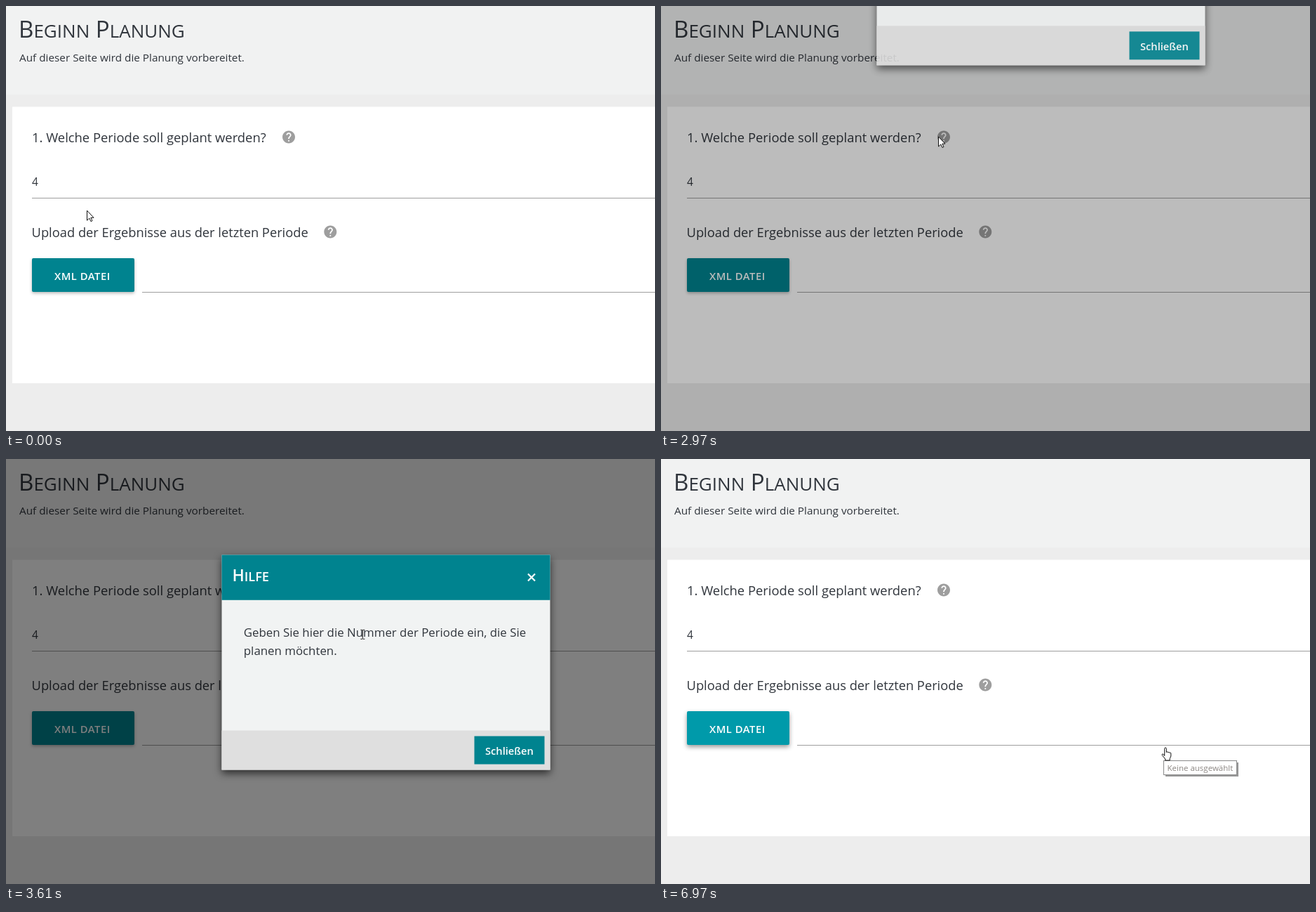
Write an HTML page that moves like this. It is 925x605 px and loops after 7050 ms.

```html
<!DOCTYPE html>
<html lang="de">
<head>
<meta charset="utf-8">
<title>Beginn Planung</title>
<style>
  html, body { margin: 0; width: 100%; height: 100%; overflow: hidden; background: #ededed; }
  svg { display: block; width: 100%; height: 100%; font-family: "Open Sans", "Noto Sans", sans-serif; fill: #30353c; }
  .title { font-size: 33px; }
  .title tspan { font-size: 26px; }
  .light { fill: #fff; font-weight: 600; }
  .rule { stroke: #9e9e9e; }
  #dialog > rect:first-child { filter: drop-shadow(0 5px 6px rgba(0, 0, 0, .65)); }
  .pointer { fill: #fff; stroke: #111; stroke-linejoin: round; }
</style>
</head>
<body>
<svg viewBox="0 0 925 605">
  <defs>
    <path id="help" fill="#9e9e9e" transform="scale(.9) translate(-12 -12)" d="M12 2C6.48 2 2 6.48 2 12s4.48 10 10 10 10-4.48 10-10S17.52 2 12 2zm1 17h-2v-2h2v2zm2.07-7.75l-.9.92C13.45 12.9 13 13.5 13 15h-2v-.5c0-1.1.45-2.1 1.17-2.83l1.24-1.26c.37-.36.59-.86.59-1.41 0-1.1-.9-2-2-2s-2 .9-2 2H8c0-2.21 1.79-4 4-4s4 1.79 4 4c0 .88-.36 1.68-.93 2.25z"/>
  </defs>

  <rect width="925" height="605" fill="#ededed"/>
  <rect width="925" height="126" fill="#f1f2f2"/>
  <text class="title" x="18" y="45">B<tspan>EGINN</tspan> P<tspan>LANUNG</tspan></text>
  <text x="19" y="79" font-size="15.3">Auf dieser Seite wird die Planung vorbereitet.</text>

  <rect x="9" y="143.5" width="916" height="393.5" fill="#fff"/>
  <text x="37" y="194" font-size="18.4">1. Welche Periode soll geplant werden?</text>
  <use href="#help" x="403" y="186.5"/>
  <text x="37" y="256" font-size="15.5">4</text>
  <path class="rule" d="M37 273.5H925M194 407.5H925"/>
  <text x="36.6" y="329" font-size="18.3">Upload der Ergebnisse aus der letzten Periode</text>
  <use href="#help" x="462.3" y="321.5"/>
  <rect id="upload" x="37" y="359" width="146" height="48" rx="2"/>
  <text class="light" x="69" y="389.7" font-size="14.8" letter-spacing=".5">XML DATEI</text>

  <rect id="overlay" width="925" height="605" fill="#000"/>

  <g id="dialog">
    <rect x="307.5" width="468" height="306" fill="#f1f3f3"/>
    <rect x="307.5" width="468" height="64.3" fill="#00838f"/>
    <text class="light" x="322.5" y="37.5" font-size="23">H<tspan font-size="18.2">ILFE</tspan></text>
    <path d="M744 27l10 10m0-10l-10 10" stroke="#fff" stroke-width="2.2"/>
    <text x="338.8" y="116" font-size="16.85">Geben Sie hier die Nummer der Periode ein, die Sie</text>
    <text x="338.8" y="142.5" font-size="16.85">planen möchten.</text>
    <rect x="307.5" y="250" width="468" height="56" fill="#dfdfdf"/>
    <rect x="667.5" y="258" width="100" height="40" fill="#00838f"/>
    <circle id="ripple" cx="717" cy="273" r="9" fill="#fff" opacity=".13"/>
    <text class="light" x="683" y="284.3" font-size="14.7">Schließen</text>
  </g>

  <g id="tooltip">
    <path d="M719 432h104v20H719z" fill="#777" opacity=".75"/>
    <rect x="716.5" y="429.5" width="104" height="20" fill="#fff" stroke="#8a8a8a"/>
    <text x="721.5" y="444" font-size="11.5" fill="#8b8682">Keine ausgewählt</text>
  </g>

  <g id="cursor">
    <path id="arrow" class="pointer" d="M.5.5V14.5L3.8 11.4 6 16 8 15 5.9 10.6H10Z"/>
    <path id="beam" fill="none" stroke="#222" d="M-3-6.5h2.5L0-6 .5-6.5H3M0-6V6M-3 6.5h2.5L0 6l.5.5H3"/>
    <path id="hand" class="pointer" transform="translate(-5.8 -.5)" d="M4.5 12V1.8a1.3 1.3 0 0 1 2.6 0V7a1.2 1.2 0 0 1 2.3.4 1.2 1.2 0 0 1 2.2.5 1.1 1.1 0 0 1 2 .6V12.5L12 16v2.5H5.5v-2L1 11Q.6 9.2 2.3 9.4Z"/>
  </g>
</svg>

<script>
const LOOP = 7050;
const $ = id => document.getElementById(id);
const clamp = v => Math.max(0, Math.min(1, v));
const mix = (a, b, p) => a + (b - a) * p;
const smooth = p => p * p * (3 - 2 * p);
const show = (id, opacity) => $(id).setAttribute("opacity", opacity);

// Number of steps already taken in an evenly stepped stretch of time.
const stepsTaken = (t, start, end, count) => t < start ? 0 :
  Math.min(count, Math.floor((t - start + 8) / ((end - start) / (count - 1))) + 1);

// Moves of the pointer: start, end, steps, target x and y, bend of the path.
const moves = [
  [840, 1460, 9, 264, 236.5],
  [1550, 2190, 9, 388, 188.5],
  [2280, 2350, 2, 395, 185.5],
  [3380, 4070, 10, 717, 399, 1.15],
  [4160, 4240, 2, 719.3, 410],
  [6350, 6351, 2, 719, 411]
];

function pointerAt(t) {
  let x = 115, y = 290.7;
  for (const [start, end, count, toX, toY, bend = 1] of moves) {
    const p = smooth(stepsTaken(t, start, end, count) / count);
    x = mix(x, toX, p);
    y = mix(y, toY, p ** bend);
  }
  return [x, y];
}

function pointerShape(t, x, y) {
  const dialogOpen = t >= 3060 && t < 5620;
  if (!dialogOpen) return y > 400 ? "hand" : y > 229 && y < 273 ? "beam" : "arrow";
  if (x > 667 && y > 393) return "hand";
  return x > 339 && y > 235 && y < 286 ? "beam" : "arrow";
}

const dimming = [[2660, .02], [2820, .11], [2970, .26], [3290, .46], [3380, .5]];
function dimAt(t) {
  if (t < 2660) return 0;
  for (let i = 1; i < dimming.length; i++) {
    const [t0, a] = dimming[i - 1], [t1, b] = dimming[i];
    if (t < t1) return mix(a, b, (t - t0) / (t1 - t0));
  }
  return .5;
}

function draw(t) {
  const opened = stepsTaken(t, 2660, 3290, 9);
  const openTime = t >= 3380 ? t : opened ? 2660 + (opened - 1) * 78.75 : 0;
  const closed = Math.max(0, stepsTaken(t, 5470, 5700, 4) - 1) / 3;

  show("overlay", dimAt(openTime) * (1 - closed));

  const left = 1 - clamp((openTime - 2611) / 705);
  const top = 136 - 2000 * left ** 2.37 + (t >= 3380 && t < 5470 ? .5 : 0);
  $("dialog").setAttribute("transform", `translate(0 ${top})`);
  show("dialog", (1 - left ** 2.9) * (1 - closed));
  show("ripple", t >= 5470 ? .13 : 0);

  const upload = $("upload");
  upload.setAttribute("fill", `rgb(0 ${mix(131, 154, closed)} ${mix(143, 170, closed)})`);
  upload.style.filter = `drop-shadow(0 ${mix(2, 3, closed)}px ${mix(2, 3, closed)}px rgba(0,0,0,${mix(.28, .4, closed)}))`;

  show("tooltip", stepsTaken(t, 6880, 6970, 2) / 2);

  const [x, y] = pointerAt(t);
  const shape = pointerShape(t, x, y);
  $("cursor").setAttribute("transform", `translate(${x} ${y})`);
  for (const id of ["arrow", "beam", "hand"]) show(id, id === shape ? 1 : 0);
}

const begin = performance.now();
function tick() {
  draw((performance.now() - begin) % LOOP);
  requestAnimationFrame(tick);
}
tick();
</script>
</body>
</html>
```
